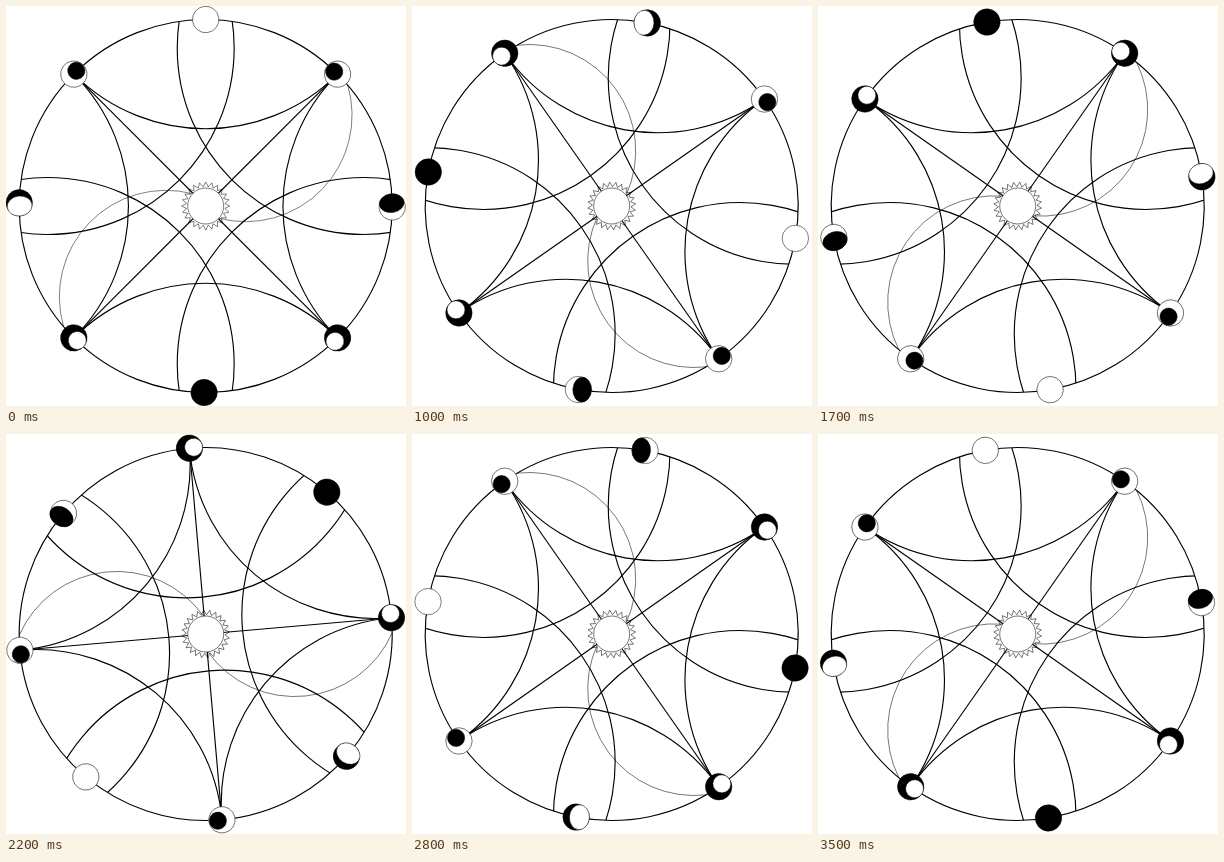
Write an HTML page that moves like this. It is 400 px wide and 400 px high and loops after 3600 ms.

```html
<!DOCTYPE html>
<html lang="en">
<head>
<meta charset="utf-8">
<title>Moon wheel</title>
<style>
html, body { margin: 0; width: 100%; height: 100%; overflow: hidden; background: #fff; }
svg { display: block; width: 100%; height: 100%; }
</style>
</head>
<body>
<svg viewBox="0 0 400 400">
  <clipPath id="inside"><circle r="186.5"/></clipPath>
  <g id="wheel" fill="none" stroke="#000" stroke-width="1.15"></g>
</svg>
<script>
const R = 186.5;          // radius of the ring and of every large arc
const HAIR = 0.5;
const wheel = document.getElementById('wheel');

const circle = (x, y, r, attrs = '') => `<circle cx="${x}" cy="${y}" r="${r}" ${attrs}/>`;
const turned = (angle, body) => `<g transform="rotate(${angle})">${body}</g>`;

function arcs() {
  let out = '';
  for (let a = 0; a < 360; a += 90) {
    out += turned(a, circle(0, -R * Math.SQRT2, R));
    out += turned(a + 45, circle(0, -223.5, R) + `<path d="M0 0V${-R}"/>`);
  }
  return `<g clip-path="url(#inside)">${out}</g>`;
}

function swirl() {
  const half = '<path d="M142-121A106.5 106.5 0 0 1 13.2 12.3"/>';
  return `<g stroke-width="${HAIR}">${half}${turned(180, half)}</g>`;
}

function sun() {
  const teeth = 24, points = [];
  for (let i = 0; i < teeth * 2; i++) {
    const r = i % 2 ? 19.3 : 24, a = i * Math.PI / teeth;
    points.push((r * Math.sin(a)).toFixed(2) + ',' + (-r * Math.cos(a)).toFixed(2));
  }
  return `<g stroke-width="${HAIR}"><polygon points="${points.join(' ')}"/>` +
    circle(0, 0, 18, 'fill="#fff"') + '</g>';
}

// A disc on the ring; the optional inner shape has the opposite colour.
function moon(angle, dark, shift = 0, rx = 0, ry = rx) {
  const [outer, inner] = dark ? ['#000', '#fff'] : ['#fff', '#000'];
  const shadow = rx ? `<ellipse cx="${shift}" rx="${rx}" ry="${ry}" fill="${inner}"/>` : '';
  return `<g transform="rotate(${angle}) translate(0 ${-R}) rotate(-8)" stroke-width="${HAIR}">` +
    circle(0, 0, 13.2, `fill="${outer}"`) + shadow + '</g>';
}

wheel.innerHTML = circle(0, 0, R) + arcs() + swirl() + sun() +
  moon(0, false) +
  moon(45, false, -4.2, 8.6) +
  moon(90.3, false, -3.8, 9.3, 12.4) +
  moon(135, true, 4.3, 9) +
  moon(180.5, true) +
  moon(225, true, -4.3, 9) +
  moon(271, true, -3.3, 10, 12.4) +
  moon(315, false, 4.2, 8.6);

function frame() {
  const step = Math.floor(performance.now() / 100) % 36;
  wheel.setAttribute('transform', `translate(199.7 200) rotate(${step * 10})`);
  requestAnimationFrame(frame);
}
frame();
</script>
</body>
</html>
```
